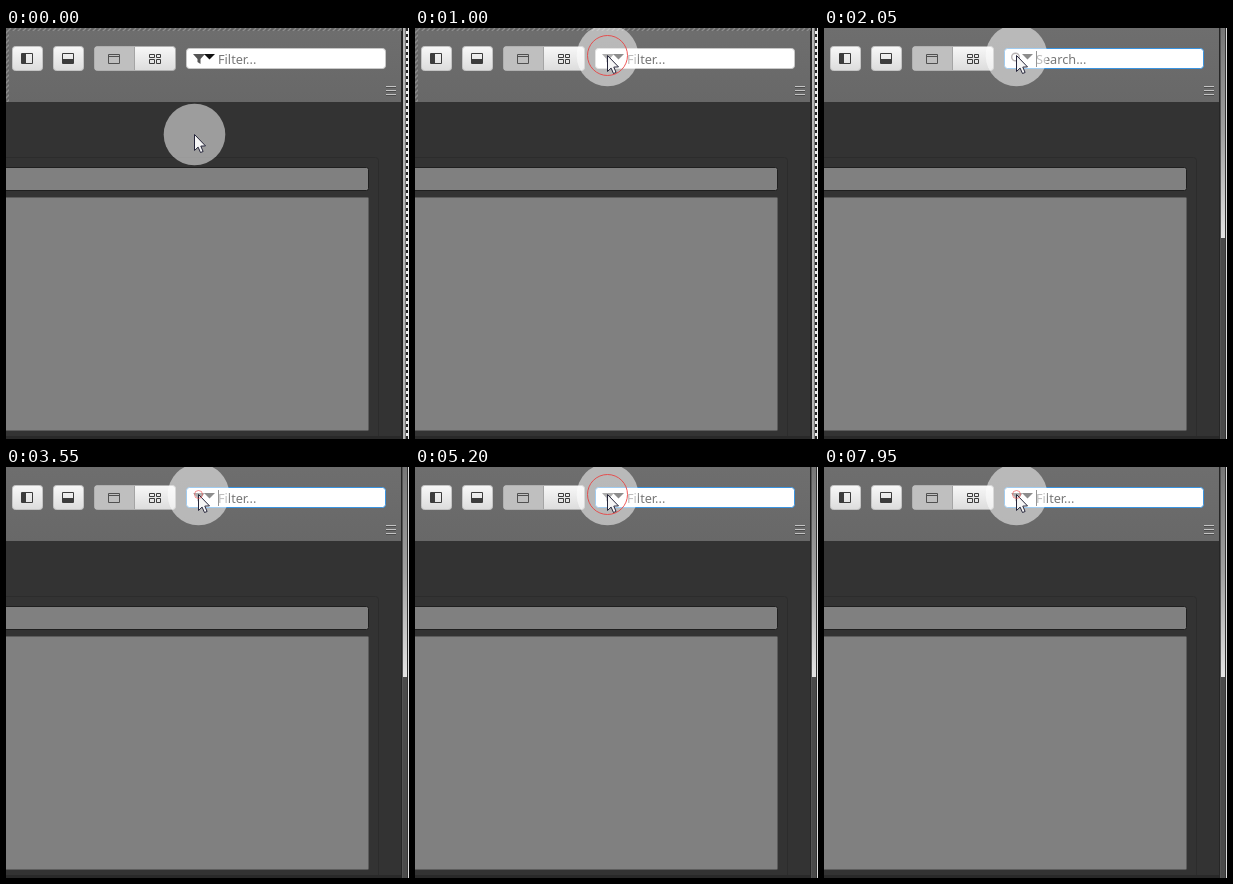
These frames come from a looping animation (403 by 411 pixels, 8 s). An HTML page with a canvas:

```html
<!DOCTYPE html>
<html lang="en">
<head>
<meta charset="utf-8">
<title>Toolbar search toggle</title>
<style>
html, body { margin: 0; width: 100%; height: 100%; overflow: hidden; background: #333; }
canvas { display: block; }
</style>
</head>
<body>
<canvas id="stage" width="403" height="411"></canvas>
<script>
const ctx = document.getElementById('stage').getContext('2d');
const W = 403, H = 411, LOOP = 8000, STEP = 50;
const CLICKS = [1000, 3350, 5200, 7750];
const FOCUS_AT = 1050, TOGGLE_DELAY = 100;
const RING_LIFE = 250, RING_SIZE = 20;
const CARET_START = 2050, CARET_HALF = 537.5;

function rect(x, y, w, h, color) {
  ctx.fillStyle = color;
  ctx.fillRect(x, y, w, h);
}

function box(x, y, w, h, r, fill, stroke) {
  ctx.beginPath();
  ctx.roundRect(x + 0.5, y + 0.5, w - 1, h - 1, r);
  if (fill) { ctx.fillStyle = fill; ctx.fill(); }
  if (stroke) { ctx.strokeStyle = stroke; ctx.lineWidth = 1; ctx.stroke(); }
}

function poly(points, fill, stroke) {
  ctx.beginPath();
  points.forEach(([x, y]) => ctx.lineTo(x, y));
  ctx.closePath();
  if (fill) { ctx.fillStyle = fill; ctx.fill(); }
  if (stroke) { ctx.strokeStyle = stroke; ctx.lineWidth = 1; ctx.stroke(); }
}

function disc(x, y, r, color) {
  ctx.beginPath();
  ctx.arc(x, y, r, 0, Math.PI * 2);
  ctx.fillStyle = color;
  ctx.fill();
}

function vertical(y0, y1, ...colors) {
  const g = ctx.createLinearGradient(0, y0, 0, y1);
  colors.forEach((c, i) => g.addColorStop(i / (colors.length - 1), c));
  return g;
}

function drawButtons() {
  const face = vertical(18, 43, '#f8f8f8', '#dcdcdc');
  const ink = '#3c3c3c';
  box(6, 18, 31, 25, 3, face, '#c4c4c4');
  box(47, 18, 31, 25, 3, face, '#c4c4c4');
  box(88, 18, 82, 25, 3, face, '#b0b0b0');
  rect(89, 19, 39, 23, '#bfbfbf');
  rect(128, 19, 1, 23, '#a4a4a4');

  box(15, 25, 12, 11, 0, null, ink);
  rect(16, 26, 4, 9, ink);
  box(56, 25, 12, 11, 0, null, ink);
  rect(57, 31, 10, 4, ink);
  box(102, 26, 12, 10, 0, null, '#505050');
  rect(103, 28, 10, 1, '#505050');
  box(143, 26, 6, 4, 0, null, ink);
  box(143, 31, 6, 5, 0, null, ink);
  box(150, 26, 5, 4, 0, null, ink);
  box(150, 31, 5, 5, 0, null, ink);
}

function drawField(focused, searching, caret) {
  box(180, 20, 200, 21, 3, '#fff', focused ? '#3b94e0' : '#c8c8c8');
  if (searching) {
    ctx.strokeStyle = '#6e6262';
    ctx.lineWidth = 1.4;
    ctx.beginPath();
    ctx.arc(191.5, 29, 3.8, 0, Math.PI * 2);
    ctx.moveTo(194, 32);
    ctx.lineTo(198, 36);
    ctx.stroke();
  } else {
    poly([[187, 26], [199, 26], [194.5, 31], [194.5, 36], [191.5, 34], [191.5, 31]], '#555');
  }
  poly([[198, 26], [209, 26], [203.5, 31.5]], '#111');
  ctx.font = '12.7px "Noto Sans", "Open Sans", sans-serif';
  ctx.fillStyle = '#777';
  ctx.fillText(searching ? 'Search...' : 'Filter...', 212, 36);
  if (caret) rect(212, 23, 1, 16, '#222');
}

function drawWindow() {
  rect(0, 0, W, H, '#333');
  rect(0, 0, 396, 74, vertical(0, 74, '#6e6e6e', '#686868'));
  for (let y = 58; y <= 66; y += 4) {
    rect(380, y, 10, 1, '#c4c4c4');
    rect(380, y + 1, 10, 1, '#4c4c4c');
  }
  box(-10, 129, 383, 290, 3, null, '#2c2c2c');
  box(-10, 139, 373, 24, 2, '#808080', '#1f1f1f');
  box(-10, 169, 373, 234, 1, '#808080', '#5c5c5c');
  rect(0, 408, 396, 3, '#292929');
}

function drawEdge() {
  rect(395, 0, 1, H, '#262626');
  rect(396, 0, 7, 210, vertical(0, 210, '#777', '#a0a0a0', '#e4e4e4'));
  rect(396, 210, 7, H - 210, '#4a4a4a');
  rect(396, 0, 1, H, '#555');
  rect(401, 0, 1, H, '#333');
  rect(402, 0, 1, H, '#ddd');
}

// Hatched outline of the selected screen region
function drawSelection() {
  ctx.save();
  ctx.beginPath();
  ctx.rect(0, 0, 396, 3);
  ctx.rect(0, 0, 3, 74);
  ctx.clip();
  rect(0, 0, 396, 74, '#666');
  ctx.strokeStyle = '#8c8c8c';
  ctx.lineWidth = 1.4;
  ctx.beginPath();
  for (let x = 0; x < 470; x += 5) {
    ctx.moveTo(x, 0);
    ctx.lineTo(x - 74, 74);
  }
  ctx.stroke();
  ctx.restore();

  rect(396, 0, 7, H, '#b4b4b4');
  rect(396, 0, 1, H, '#222');
  rect(399, 0, 1, H, '#777');
  rect(400, 0, 3, H, '#eee');
  for (let y = 0; y < H; y += 6) rect(400, y, 2, 3, '#222');
}

function mix(a, b, k) { return a + (b - a) * k; }

function pointerAt(t) {
  if (t >= 850) return [192.5, 27.5];
  if (t >= 800) return [192, 31];
  const k = Math.min(1, t / 600);
  const e = k * k * (3 - 2 * k);
  const bend = -17 * Math.sin(Math.PI * e);
  return [mix(188.5, 191.5, e) + bend * 0.55, mix(106.5, 33.5, e)];
}

function drawPointer(x, y) {
  disc(x, y, 30.8, 'rgba(255,255,255,0.52)');
  const shape = [[0, 0], [0, 16], [3.6, 12.6], [6, 18], [8.6, 17], [6.3, 11.6], [11, 11.4]];
  poly(shape.map(([dx, dy]) => [x + dx, y + dy]), '#f6f6f6', '#25253a');
}

function ring(r, alpha) {
  ctx.beginPath();
  ctx.arc(192.5, 27.5, Math.max(0.5, r), 0, Math.PI * 2);
  ctx.strokeStyle = `rgba(235,60,60,${alpha})`;
  ctx.lineWidth = 1;
  ctx.stroke();
}

function drawRings(age) {
  const part = start => (age - start) / RING_LIFE;
  const shrink = k => { if (k >= 0 && k < 1) ring(RING_SIZE * (1 - k), 0.85 - 0.35 * k); };
  const grow = k => { if (k > 0 && k < 1) ring(RING_SIZE * k, 0.85 * (1 - k)); };
  shrink(part(0));
  grow(part(550));
  shrink(part(800));
}

function caretOn(t) {
  return t >= FOCUS_AT && Math.floor((t - CARET_START + 10) / CARET_HALF) % 2 === 0;
}

function draw(t) {
  const focused = t >= FOCUS_AT;
  const toggles = CLICKS.filter(c => t >= c + TOGGLE_DELAY).length;
  drawWindow();
  drawEdge();
  if (!focused) drawSelection();
  drawButtons();
  drawField(focused, toggles % 2 === 1, caretOn(t));
  drawPointer(...pointerAt(t));
  CLICKS.forEach(c => drawRings(t - c));
}

const origin = performance.now();
function tick() {
  const t = (performance.now() - origin) % LOOP;
  draw(Math.floor(t / STEP) * STEP);
  requestAnimationFrame(tick);
}
tick();
</script>
</body>
</html>
```
